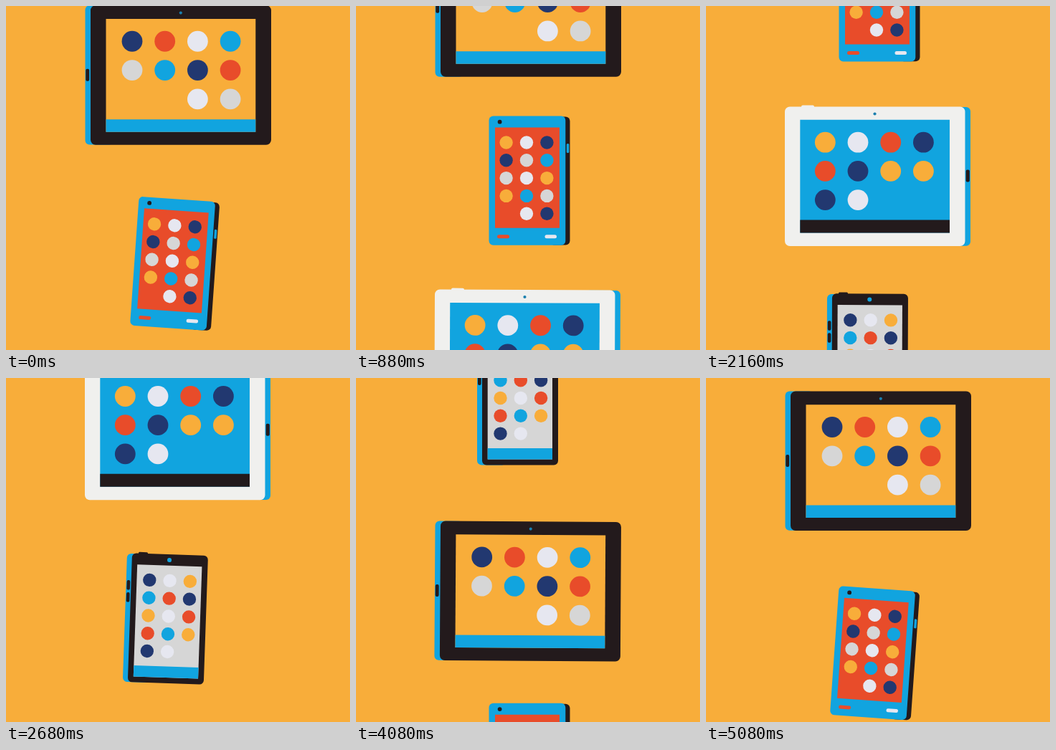
Write an HTML page with a canvas that moves like this. It is 480 by 480 pixels and loops after 5.12 s.

```html
<!DOCTYPE html>
<html lang="en">
<head>
<meta charset="utf-8">
<title>Scrolling devices</title>
<style>
  html, body { margin: 0; width: 100%; height: 100%; overflow: hidden; background: #f8ad3a; }
  canvas { display: block; width: 100%; height: 100%; }
</style>
</head>
<body>
<canvas width="480" height="480"></canvas>
<script>
const ctx = document.querySelector('canvas').getContext('2d');

const COLORS = {
  O: '#f8ad3a', N: '#223870', R: '#e84c2a', W: '#e6e7f0',
  C: '#11a4df', G: '#d6d6d6', K: '#231a1c', P: '#f0f0ee', T: '#1a7fae'
};

function box(color, x, y, right, bottom, radius = 0) {
  ctx.fillStyle = COLORS[color];
  ctx.beginPath();
  ctx.roundRect(x, y, right - x, bottom - y, radius);
  ctx.fill();
}

function dot(color, x, y, radius) {
  ctx.fillStyle = COLORS[color];
  ctx.beginPath();
  ctx.arc(x, y, radius, 0, 2 * Math.PI);
  ctx.fill();
}

// Each row is a string of colour letters; a space leaves a gap.
function icons(rows, x, y, dx, dy, radius) {
  rows.forEach((row, r) => [...row].forEach((color, c) => {
    if (color !== ' ') dot(color, x + c * dx, y + r * dy, radius);
  }));
}

// Devices are drawn at their stage x, with y measured from the top edge.
function darkTablet() {
  box('C', 110.5, 0, 150, 194.3, 6);
  box('K', 118, 0, 370, 194.5, 7);
  box('K', 111.3, 88.5, 116.2, 105.5, 2);
  box('O', 139.5, 18.7, 348.3, 176.5);
  box('C', 139.5, 159, 348.3, 176.5);
  dot('T', 243.8, 10.3, 2.1);
  icons(['NRWC', 'GCNR', '  WG'], 176, 50, 45.7, 40.3, 14.4);
}

function bluePhone() {
  box('K', 270, 1, 298.5, 180, 6);
  box('C', 185.5, 0, 292.3, 180.2, 6);
  box('C', 293.8, 38.5, 297.3, 51.5, 1.5);
  box('R', 194, 16, 284, 156.3);
  dot('K', 200.6, 8.2, 2.9);
  box('R', 197, 165.8, 214, 170.8, 2.5);
  box('W', 263.5, 165.8, 280, 170.8, 2.5);
  icons(['OWN', 'NGC', 'GWO', 'OCG', ' WN'], 209.6, 37, 28.4, 24.8, 9.2);
}

function whiteTablet() {
  box('C', 320, 0.5, 369, 194.3, 6);
  box('P', 133, -2, 151, 4, 2);
  box('P', 110, 0, 361.5, 194.5, 7);
  box('K', 362.7, 88, 367.8, 105, 2);
  box('C', 131.3, 18.3, 340, 176);
  box('K', 131.3, 158, 340, 176);
  dot('T', 235.5, 10, 2.1);
  icons(['OWRN', 'RNOO', 'NW'], 166.3, 49.7, 45.7, 40.2, 14.4);
}

function blackPhone() {
  box('C', 169, 0.8, 210, 179.8, 6);
  box('K', 185, -1.8, 198, 4, 1.5);
  box('K', 176, 0, 282, 180, 6);
  box('K', 170, 38, 174.6, 51.5, 2);
  box('K', 170, 55, 174.6, 68.5, 2);
  box('G', 183.7, 15.7, 274, 172);
  box('C', 183.7, 156.5, 274, 172);
  dot('C', 228.3, 8, 3);
  icons(['NWO', 'CRN', 'OWR', 'RCO', 'NW'], 201.5, 36.8, 28.3, 24.8, 9.2);
}

const DEVICES = [
  { draw: darkTablet, top: 0, pivot: 240, swingIn: 400 },
  { draw: bluePhone, top: 248.5, pivot: 242, swingIn: 220 },
  { draw: whiteTablet, top: 491, pivot: 239.5, swingIn: 220 },
  { draw: blackPhone, top: 752, pivot: 225.5, swingIn: 220 }
];
const LOOP = 5120, BEAT = 1280, REEL = 1006;
const START = -160;

// Scroll distance, lead before the beat and delay between neighbours (ms).
const MOVES = [
  { step: 255, lead: 362, lag: 45 },
  { step: 255.5, lead: 360, lag: 38 },
  { step: 212, lead: 360, lag: 40 },
  { step: 283.5, lead: 380, lag: 26 }
];

// Cubic Bezier (0.367, 0, 0.063, 1), solved by bisection.
function ease(x) {
  if (x <= 0) return 0;
  if (x >= 1) return 1;
  let low = 0, high = 1, s;
  for (let i = 0; i < 24; i++) {
    s = (low + high) / 2;
    const bx = 3 * s * (1 - s) ** 2 * 0.367 + 3 * s * s * (1 - s) * 0.063 + s ** 3;
    if (bx < x) low = s; else high = s;
  }
  return s * s * (3 - 2 * s);
}

// Lower devices follow the scroll slightly later than upper ones.
function scroll(t, index) {
  let y = START;
  for (let k = 1; k <= 5; k++) {
    const { step, lead, lag } = MOVES[(k - 1) % 4];
    const begin = BEAT * (k - 1) - lead + lag * (index - k);
    y += step * ease((t - begin) / 1200);
  }
  return y;
}

// A device swings from its top edge as it is pulled to the middle.
function tilt(t, index, swingIn) {
  const phase = t - BEAT * (index - 1) + 20;
  const angle = 4.1 * Math.exp(-((phase / (phase < 0 ? swingIn : 165)) ** 2));
  return angle * Math.PI / 180;
}

function render(now) {
  const t = now % LOOP;
  box('O', 0, 0, 480, 480);
  for (let index = 0; index < 7; index++) {
    const { draw, top, pivot, swingIn } = DEVICES[index % 4];
    const y = top + REEL * Math.floor(index / 4) - scroll(t, index);
    if (y < -240 || y > 500) continue;
    ctx.save();
    ctx.translate(pivot, y);
    ctx.rotate(tilt(t, index, swingIn));
    ctx.translate(-pivot, 0);
    draw();
    ctx.restore();
  }
}

const origin = performance.now();
function tick() {
  render(performance.now() - origin);
  requestAnimationFrame(tick);
}
tick();
</script>
</body>
</html>
```
